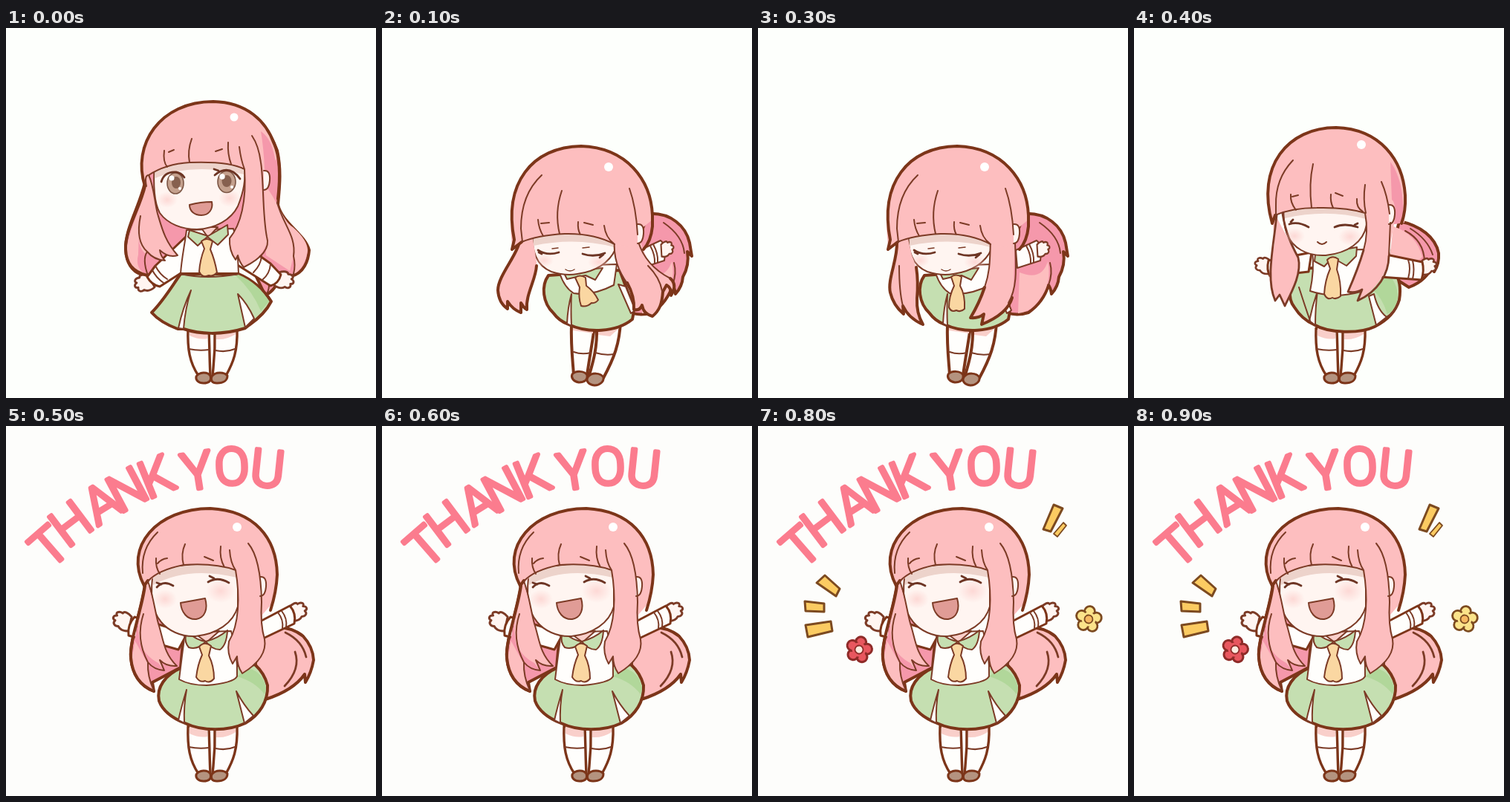
An HTML page for the animation above (1000 ms loop, 498 by 498 pixels).

```html
<!DOCTYPE html>
<html lang="en">
<head>
<meta charset="utf-8">
<title>Thank you</title>
<style>
html, body { margin: 0; width: 100%; height: 100%; overflow: hidden; background: #fdfffc; }
body { animation: paper 1s step-end infinite; }
svg { display: block; width: 100vw; height: 100vh; }
path, ellipse, circle { stroke-linecap: round; stroke-linejoin: round; }

/* line weights */
.o { stroke: #7c3519; stroke-width: 4; }
.i { stroke: #7c3b26; stroke-width: 2; }
.n { fill: none; }

/* fills */
.h { fill: #fdbebf; }
.d { fill: #f598ab; }
.s { fill: #fff5f1; }
.w { fill: #fffefc; }
.g { fill: #c5dfb1; }
.k { fill: #b1d79a; }
.t { fill: #fad7a2; }
.e { fill: #b4937f; }
.m { fill: #e09c96; }
.u { fill: #edd3cb; }
.p { fill: #f9cfca; }
.b { fill: url(#blush); }
.lash { fill: none; stroke: #6d3524; stroke-width: 2.8; }

.words text {
  font: 300 69px Roboto, Arial, sans-serif;
  text-anchor: middle;
  fill: #fb7c8e; stroke: #fb7c8e; stroke-width: 5.4; stroke-linejoin: round;
}

.pose, .words, .extras { visibility: hidden; animation: 1s step-end infinite; }
.stand { animation-name: stand; }
.bow { animation-name: bow; }
.swing { animation-name: swing; }
.hang { animation-name: hang; }
.rise { animation-name: rise; }
.cheer, .words { animation-name: cheer; }
.extras { animation-name: extras; }
@keyframes paper { 0% { background: #fdfffc } 50%, 100% { background: #fdfdfb } }
@keyframes stand { 0% { visibility: visible } 10%, 100% { visibility: hidden } }
@keyframes bow { 0% { visibility: hidden } 10% { visibility: visible } 40%, 100% { visibility: hidden } }
@keyframes swing { 0% { visibility: hidden } 10% { visibility: visible } 20%, 100% { visibility: hidden } }
@keyframes hang { 0% { visibility: hidden } 20% { visibility: visible } 40%, 100% { visibility: hidden } }
@keyframes rise { 0% { visibility: hidden } 40% { visibility: visible } 50%, 100% { visibility: hidden } }
@keyframes cheer { 0% { visibility: hidden } 50%, 100% { visibility: visible } }
@keyframes extras { 0% { visibility: hidden } 70%, 100% { visibility: visible } }
</style>
</head>
<body>
<svg viewBox="0 0 498 498" preserveAspectRatio="none">
<defs>
  <radialGradient id="blush">
    <stop offset="0" stop-color="#fcc9c6" stop-opacity=".65"/>
    <stop offset="1" stop-color="#fcc9c6" stop-opacity="0"/>
  </radialGradient>
  <g id="legs">
    <path class="w o" style="stroke-width:3.4" d="M245,404C244,432 247,450 259,468H275C274,448 274,430 273,406Z"/>
    <path class="w o" style="stroke-width:3.4" d="M281,406C282,440 279,455 278,468H296C306,450 312,435 311,404Z"/>
    <path class="p" d="M247,404V414Q260,420 271,418V404ZM283,404V419Q297,420 309,412V404Z"/>
    <path class="n i" d="M246,432Q260,435 273,433M282,434Q296,437 308,432"/>
    <path class="e o" style="stroke-width:3" d="M256,469C260,463 271,462 275,468C277,475 273,478 266,478C259,478 255,474 256,469ZM277,469C282,462 294,463 298,468C298,474 293,478 284,478C277,478 275,474 277,469Z"/>
  </g>
  <!-- hand pointing left, wrist at the origin -->
  <path id="hand" class="s i" style="stroke-width:2.6" d="M0,-9C-5,-13 -10,-14 -11,-11C-16,-13 -20,-10 -17,-7C-22,-6 -22,-2 -18,-1C-21,3 -17,6 -13,5C-10,9 -4,9 0,8Z"/>
  <path id="ear" class="s i" d="M-1,-13Q8,-14 7,0Q6,13 -1,13"/>
  <g id="flower">
    <g>
      <circle cy="-10.5" r="7"/><circle cy="-10.5" r="7" transform="rotate(72)"/>
      <circle cy="-10.5" r="7" transform="rotate(144)"/><circle cy="-10.5" r="7" transform="rotate(216)"/>
      <circle cy="-10.5" r="7" transform="rotate(288)"/>
    </g>
    <circle r="9.5" stroke="none"/>
  </g>
</defs>

<!-- standing -->
<g class="pose stand">
  <path class="d o" d="M187,208C180,240 160,270 161,298C162,317 169,327 182,332L190,334L243,300H320L349,360C358,355 365,347 366,337L384,334C401,330 407,313 408,299C402,277 372,263 366,238C368,215 371,192 365,165C354,135 335,115 320,112L200,180Z"/>
  <path class="h" d="M347,210C365,230 371,258 386,268C400,280 406,291 406,299C404,315 396,328 387,331Q390,320 387,307L382,327L350,306Z"/>
  <path class="n i" d="M365,235C373,265 391,280 387,307Q390,320 387,331M346,326Q359,342 351,358"/>
  <use href="#legs"/>
  <use href="#hand" transform="translate(196 341) rotate(-28) scale(1.1)"/>
  <use href="#hand" transform="translate(364 338) scale(-1.1 1.1) rotate(-22)"/>
  <path class="w o" style="stroke-width:3" d="M243,280L201,320L190,335Q196,346 207,348L240,327L245,298ZM308,283L356,317L370,332Q367,344 356,347L310,318Z"/>
  <path class="n i" d="M201,320Q207,332 217,338M197,326Q202,336 212,343M344,307Q343,319 333,329M356,318Q355,331 345,339"/>
  <path class="w i" d="M243,272L306,270C312,290 312,310 313,331H235C236,312 240,295 243,272Z"/>
  <path class="g o" d="M235,331H313C330,338 347,352 357,368C350,382 340,391 327,400L322,404C290,414 260,412 239,405L231,405C215,399 204,392 196,383C212,367 223,348 235,331Z"/>
  <path class="k" d="M313,332C330,339 346,353 354,368L343,381Q332,354 309,333Z"/>
  <path class="w i" d="M249,353Q238,376 232,404L239,405Q241,378 249,353ZM312,358L322,403L334,391Q325,371 312,358Z"/>
  <path class="n i" d="M235,331Q270,339 313,331"/>
  <path class="p i" d="M262,268L272,282L285,268Z"/>
  <path class="g i" d="M247,272L245,281L258,293L271,281L285,292L299,278L298,265L272,280Z"/>
  <path class="t i" d="M263,287Q270,281 278,287L275,298Q281,312 284,329Q279,335 273,333Q264,337 260,328Q261,312 267,297Z"/>
  <path class="s i" d="M200,180C198,209 199,235 207,249C218,264 237,271 257,271C282,270 303,258 312,240C320,220 323,205 321,180Z"/>
  <path class="u" d="M201,191Q250,174 319,186L320,197Q250,181 201,202Z"/>
  <path class="h" d="M185,212C172,160 204,99 279,99C340,101 363,145 365,175L352,192L345,215C347,252 356,268 350,292C343,310 330,316 320,322Q314,315 312,306L309,312Q300,300 301,283C316,265 323,233 321,190Q300,179 247,181Q215,183 192,198C199,212 200,235 204,250C210,270 214,287 231,306Q219,310 207,299Q208,307 214,313Q199,312 190,301C185,310 187,322 191,333C166,327 160,309 163,292C169,265 180,245 188,215Z"/>
  <path class="d" d="M343,139C359,150 365,174 365,220L357,222Q359,198 348,190Q347,163 343,139ZM179,272Q177,296 188,304Q185,318 190,332Q173,325 178,305Z"/>
  <use href="#ear" transform="translate(348 205)"/>
  <path class="n o" d="M187,213C169,157 207,99 279,99C324,100 350,125 361,156C370,176 369,204 366,230M187,213C180,243 160,272 161,298C162,317 170,328 190,333"/>
  <path class="n i" d="M189,213Q186,198 192,198Q215,183 247,181Q300,179 321,190C324,233 316,265 301,283Q300,300 309,312L312,306Q314,315 320,322C344,310 356,297 351,281C345,250 347,205 343,181Q340,158 331,145M192,198C199,212 200,235 204,250C210,270 214,287 231,306Q219,310 207,299Q208,307 214,313Q199,312 190,301C184,310 187,322 191,333M181,253Q174,287 190,301M213,165Q211,180 217,187M250,149Q244,165 247,181M299,154Q298,170 303,183M314,160Q316,177 321,190M219,167L226,164M282,166L291,163"/>
  <circle fill="#fff" cx="307" cy="120" r="5.5"/>
  <ellipse class="b" cx="217" cy="231" rx="14" ry="11"/><ellipse class="b" cx="301" cy="229" rx="15" ry="12"/>
  <ellipse cx="228" cy="209" rx="11" ry="14" fill="#c4a08d" stroke="#7c5645" stroke-width="1.6"/>
  <ellipse cx="297" cy="207" rx="12" ry="14.500" fill="#c4a08d" stroke="#7c5645" stroke-width="1.6"/>
  <ellipse cx="229" cy="208" rx="6" ry="8" fill="#86604f"/><ellipse cx="297" cy="206" rx="6.500" ry="8" fill="#86604f"/>
  <g fill="#fff"><circle cx="223" cy="202" r="3.500"/><circle cx="291" cy="200" r="3.700"/><circle cx="234" cy="216" r="2"/><circle cx="304" cy="214" r="2"/></g>
  <path class="lash" d="M209,207Q213,193 229,194Q236,195 240,201M281,198Q294,187 306,194Q312,198 315,203M280,190L286,192"/>
  <path class="m i" d="M247,238Q262,234 277,234C279,244 273,252 263,252C253,252 247,246 247,238Z"/>
</g>

<!-- bowing -->
<g class="pose bow">
  <path class="d o" d="M358,250C389,248 409,267 414,289L417,307L411,301Q414,319 405,335Q404,348 395,358Q394,350 391,346C386,363 377,374 364,383Q348,388 335,383L340,300Z"/>
  <path class="h" d="M352,329Q382,341 390,314Q396,343 379,365Q368,382 350,384Z"/>
  <path class="n i" d="M379,262Q405,280 407,303M391,346Q397,330 393,316"/>
  <path class="w o" d="M255,398C254,430 257,450 258,467H276C279,445 283,425 286,402Z"/>
  <path class="w o" d="M289,402C290,430 284,450 279,467L298,471C312,445 320,425 321,394Z"/>
  <path class="p" d="M257,400V407L284,411V402ZM291,402V413L307,415L319,404V397Z"/>
  <path class="n i" d="M258,436Q269,440 281,437M287,437Q300,441 312,439"/>
  <path class="e o" style="stroke-width:3" d="M256,466C261,461 272,461 276,467C277,474 272,477 265,477C258,476 254,471 256,466ZM277,470C282,463 294,464 298,470C299,476 293,481 286,481C278,480 274,475 277,470Z"/>
  <path class="g o" d="M224,333C214,347 216,370 231,384Q238,394 251,399C277,411 315,410 337,392Q340,380 337,372L320,326Z"/>
  <path class="w i" d="M255,358Q250,376 249,398L255,401Q254,378 255,358ZM318,345L335,384L341,380L328,348Z"/>
  <path class="w i" d="M239,330Q246,350 258,357Q283,361 312,346L316,318L255,320Z"/>
  <path class="g i" d="M244,328L249,338L262,335L274,333L287,339L297,323Z"/>
  <path class="s i" d="M203,272C200,304 211,321 228,328Q247,334 263,331C287,328 306,316 314,298V270Z"/>
  <path class="u" d="M204,276H313V295Q260,281 204,293Z"/>
  <path class="w i" d="M347,299L375,286Q383,292 380,313L349,323Z"/>
  <path class="n i" d="M361,293Q368,306 367,317M365,291Q372,304 371,315"/>
  <use href="#hand" transform="translate(376 300) scale(-.8 .95) rotate(4)"/>
</g>
<g class="pose swing">
  <path class="t i" d="M260,336Q266,331 274,336L275,347Q285,354 291,366Q287,371 282,370Q276,376 268,374Q264,363 266,349Z"/>
  <path class="h" d="M185,288C181,307 156,334 156,356Q158,370 168,377L169,368Q175,378 187,383L186,370Q189,376 195,379C193,357 209,337 208,315L203,284Z"/>
  <path class="n o" d="M185,288C181,307 156,334 156,353Q157,370 169,378L169,368Q176,379 187,383L187,370Q190,376 195,379C193,359 207,339 208,320"/>
  <path class="h" d="M312,283C312,308 316,320 330,343Q338,366 339,380Q348,380 350,375Q351,384 363,388C374,380 377,370 378,359L382,348Q387,350 389,359Q396,347 388,337C362,326 350,306 345,270Z"/>
  <path class="n o" d="M330,343Q340,361 339,379Q347,381 350,373Q352,385 364,388C374,380 377,370 378,355L383,346Q390,350 389,360Q398,346 388,337"/>
  <path class="n i" d="M313,285C311,309 318,327 331,345M345,288Q355,320 388,337M358,320Q374,336 377,354"/>
</g>
<g class="pose hang">
  <path class="t i" d="M260,335Q266,330 274,335L272,347Q279,359 278,378Q273,383 267,380Q260,383 257,376Q257,361 264,347Z"/>
  <path class="h" d="M187,288C188,312 174,338 178,356Q182,373 196,385L195,374Q203,391 222,399Q213,384 215,365C214,343 215,323 207,306L202,284Z"/>
  <path class="n o" d="M187,288C188,312 174,338 178,356Q182,373 196,385L195,374Q203,391 222,399Q213,384 214,364Q216,341 213,322"/>
  <path class="h" d="M312,283C312,309 313,326 305,349Q298,370 286,390Q297,391 304,385L301,399C324,389 341,374 344,350L346,270Z"/>
  <path class="n o" d="M305,349Q298,370 286,390Q297,391 304,385L301,399C323,390 338,378 342,363"/>
  <path class="n i" d="M313,285C312,309 313,326 305,349M346,288C347,320 350,348 337,370M190,320Q190,355 195,374"/>
</g>
<g class="pose bow">
  <path class="h" d="M176,298C163,208 200,160 268,159C330,161 361,205 364,258L353,267Q345,271 344,296L313,291Q282,277 246,277Q209,280 188,289Z"/>
  <use href="#ear" transform="translate(345 277)"/>
  <path class="n o" d="M188,288L175,298L178,285C163,209 202,160 268,159C330,161 362,205 364,252V267Q362,287 352,298"/>
  <path class="n i" d="M188,288Q209,279 246,277Q285,276 313,291M215,198Q187,224 187,270L189,288M242,219Q232,248 239,277M333,216Q342,241 344,278M210,258Q211,270 217,280M264,261Q263,271 267,278M299,266Q301,282 312,290M214,263L225,262M272,262L284,265"/>
  <circle fill="#fff" cx="305" cy="187" r="6"/>
  <ellipse class="b" cx="218" cy="313" rx="13" ry="9"/><ellipse class="b" cx="292" cy="315" rx="15" ry="10"/>
  <path class="lash" d="M210,299Q222,307 238,302M270,304Q285,309 300,303M211,302L215,304M298,305L293,309"/>
  <path class="n i" style="stroke-width:1.5" d="M229,297L237,296M270,296L279,295M247,325Q253,329 259,325"/>
</g>

<!-- rising -->
<g class="pose rise">
  <path class="d o" d="M357,260C386,266 406,282 410,303Q411,318 404,328L402,319Q394,340 370,349L340,330Z"/>
  <path class="h" d="M349,267Q380,277 388,308L366,330L344,310Z"/>
  <path class="n i" d="M365,273Q390,286 391,314M372,270Q395,284 402,305"/>
  <use href="#legs"/>
  <path class="g o" d="M223,324C208,343 206,364 216,376Q226,392 242,399C262,411 303,412 324,402Q350,389 357,366Q361,342 350,326L300,320Z"/>
  <path class="k" d="M341,330Q358,347 354,368Q349,383 341,385Q334,362 319,350Z"/>
  <path class="w i" d="M247,354Q240,374 236,394L244,400Q244,376 247,354ZM316,361L326,400L340,389Q328,380 323,358Z"/>
  <path class="n i" d="M222,349Q230,374 237,394M340,389Q353,382 357,366"/>
  <use href="#hand" transform="translate(183 323) rotate(8)"/>
  <use href="#hand" transform="translate(387 324) scale(-1 1) rotate(8)"/>
  <path class="w o" style="stroke-width:3" d="M239,302L181,313Q178,325 183,334L235,328ZM325,302L388,315Q391,326 387,339L318,334Z"/>
  <path class="n i" d="M369,312Q373,323 369,337M375,313Q378,325 375,338"/>
  <path class="w i" d="M240,300L311,298Q302,329 305,355Q270,365 237,354Q243,326 240,300Z"/>
  <path class="g i" d="M244,305L243,314L256,321L267,309L286,320L299,307L300,295Z"/>
  <path class="t i" d="M260,312Q267,305 275,311L273,325Q279,342 278,361Q272,366 267,363Q260,367 256,358Q257,340 264,324Z"/>
  <path class="s i" d="M202,240C199,272 209,290 225,299Q239,307 258,306C288,303 309,288 313,265V236Z"/>
  <path class="u" d="M203,242H312V257Q260,243 203,256Z"/>
  <path class="h" d="M187,262C163,184 209,134 272,134C332,136 362,178 364,223V262L350,264L343,301C344,326 327,353 300,367L307,354Q299,357 288,355Q302,323 309,299Q315,274 311,249Q283,242 246,242Q211,243 191,252C203,278 213,290 221,309C226,329 214,352 203,374L196,360L190,367C179,348 182,320 189,291Z"/>
  <path class="d" d="M345,180C360,200 364,231 362,262L350,264Q354,237 347,231Z"/>
  <use href="#ear" transform="translate(344 251)"/>
  <path class="n o" d="M190,252L186,263C164,186 207,134 272,134C332,136 362,178 365,225Q366,247 360,263"/>
  <path class="n i" style="stroke-width:2.800" d="M192,252C188,294 177,337 190,367L196,359L203,374C214,352 226,329 221,309C212,292 204,276 200,250M309,299Q302,323 288,355Q299,357 307,352L301,367C328,355 343,331 343,307"/>
  <path class="n i" d="M190,252Q213,242 246,242Q286,241 311,249Q316,275 309,299M343,307L345,262M214,178Q190,203 191,239V252M241,183Q235,210 239,242M333,207Q341,225 344,250M211,224Q210,235 218,245M265,224Q264,234 268,242M300,230Q299,242 308,247M311,211Q308,231 312,249M213,227L221,225M271,222L281,226"/>
  <circle fill="#fff" cx="306" cy="157" r="6"/>
  <ellipse class="b" cx="216" cy="280" rx="14" ry="11"/><ellipse class="b" cx="291" cy="281" rx="16" ry="12"/>
  <path class="lash" d="M209,264Q221,260 235,268M270,268Q283,262 301,268M211,261L214,258M297,265L301,263"/>
  <path class="n i" d="M247,288Q253,294 259,288"/>
</g>

<!-- cheering -->
<g class="pose cheer">
  <path class="d o" d="M187,213C183,245 166,290 168,312C170,334 179,349 199,357L197,345L235,325L240,270Z"/>
  <path class="h o" d="M340,274Q379,265 400,283Q413,297 414,315Q411,332 403,345L402,334C391,350 371,361 349,368L335,330Z"/>
  <path class="n i" style="stroke-width:2.800" d="M389,304Q397,327 375,350M376,278Q399,289 404,311"/>
  <use href="#legs"/>
  <path class="g o" d="M237,325C214,335 202,352 206,370Q213,389 241,400C264,411 299,411 322,400C341,389 353,371 352,349Q348,333 335,321Z"/>
  <path class="k" d="M326,326Q346,331 350,353L348,361Q335,344 311,337Z"/>
  <path class="w i" d="M243,355Q236,378 232,396L240,400Q239,377 243,355ZM310,357L321,400L333,390Q320,376 310,357Z"/>
  <use href="#hand" transform="translate(167 267) rotate(12) scale(1.15)"/>
  <use href="#hand" transform="translate(383 254) scale(-1.1 1.1) rotate(12)"/>
  <path class="w o" style="stroke-width:3" d="M244,279L173,257Q163,268 165,282L232,301ZM325,272L382,242Q391,252 388,266L327,295Z"/>
  <path class="n i" d="M181,260Q174,271 177,285M366,251Q374,261 372,273M371,249Q379,259 377,271"/>
  <path class="w i" d="M241,278L303,276Q312,306 311,337Q306,346 270,349Q247,349 233,341Q237,308 241,278Z"/>
  <path class="p i" d="M255,280L270,291L287,276Z"/>
  <path class="g i" d="M242,282Q240,291 246,298Q258,302 269,290Q277,301 288,301Q297,295 298,275Q285,286 269,290Q256,288 248,280Z"/>
  <path class="t i" d="M260,297Q267,289 276,296L273,309Q280,323 280,340Q274,347 268,343Q261,346 256,338Q258,321 264,308Z"/>
  <path class="s i" d="M199,190C193,226 196,249 209,264C218,275 235,284 255,283C284,280 306,265 312,243V184Z"/>
  <path class="u" d="M199,198Q247,180 311,190V204Q245,188 198,214Z"/>
  <path class="h" d="M187,215C158,163 203,111 275,111C334,114 364,150 365,200L358,239L345,254C342,275 357,294 342,312Q331,324 318,333Q311,323 311,310L305,320Q297,306 300,290C314,267 315,228 309,194Q281,185 239,187Q204,194 191,212C198,230 201,254 206,269C212,289 213,307 230,323Q216,324 207,315L213,329Q199,328 191,318Q190,337 199,356C175,348 164,327 171,304Z"/>
  <path class="d" d="M183,238Q175,263 180,291Q186,309 205,319L212,328Q196,328 188,315L173,288Z"/>
  <use href="#ear" transform="translate(343 216)"/>
  <path class="n o" d="M191,208L186,215C158,163 203,111 275,111C334,114 364,150 365,200Q364,223 356,248M187,215C183,247 166,288 168,312C170,334 179,349 199,357"/>
  <path class="n i" d="M191,209Q204,194 239,187Q281,184 309,194C315,229 314,267 300,290Q297,306 305,320L311,310Q311,323 318,333C341,319 351,304 348,287Q342,267 344,237Q343,178 326,158M191,209C199,230 201,254 206,269C212,289 213,307 230,323Q216,324 207,315L213,329Q199,328 191,318Q190,337 199,356M185,253Q174,286 191,318M202,178Q201,190 207,199M241,159Q235,172 239,187M289,162Q287,178 294,190M301,167Q302,184 309,194M204,185Q209,179 217,178M267,176L279,181M204,143Q181,165 184,198"/>
  <circle fill="#fff" cx="311" cy="136" r="6"/>
  <ellipse class="b" cx="214" cy="233" rx="16" ry="13"/><ellipse class="b" cx="289" cy="222" rx="20" ry="16"/>
  <path class="lash" d="M203,217Q212,207 225,215M272,210Q285,202 300,211M203,211L209,213M274,202L280,205"/>
  <path class="m i" d="M235,238Q252,235 268,232C272,246 268,258 256,260C244,261 236,251 235,238Z"/>
</g>

<g class="words">
  <text transform="translate(58 162) rotate(-41)" y="24.500">T</text>
  <text transform="translate(87 131) rotate(-37)" y="24.500">H</text>
  <text transform="translate(128 103) rotate(-32)" y="24.500">A</text>
  <text transform="translate(163 85) rotate(-28)" y="24.500">N</text>
  <text transform="translate(202 68) rotate(-22)" y="24.500">K</text>
  <text transform="translate(257 60) rotate(-9)" y="24.500">Y</text>
  <text transform="translate(304 54) rotate(-2)" y="24.500">O</text>
  <text transform="translate(352 57) rotate(6)" y="24.500">U</text>
</g>

<g class="extras">
  <path fill="#fbcb62" stroke="#7c4a20" stroke-width="3" d="M79,211L90,201L110,219L105,229ZM63,236L89,239V250L64,249ZM64,268L98,263L100,276L67,284ZM398,106L410,111L394,142L384,139Z"/>
  <path fill="#fbcb62" stroke="#7c4a20" stroke-width="1.800" d="M411,130L415,134L403,149L398,145Z"/>
  <g transform="translate(136 301) rotate(14)">
    <use href="#flower" fill="#e8575f" stroke="#8e2b28" stroke-width="3"/>
    <circle r="5.500" fill="#fdebe0" stroke="#8e2b28" stroke-width="1.800"/>
  </g>
  <g transform="translate(445 260) rotate(8)">
    <use href="#flower" fill="#fbe38a" stroke="#7c4a20" stroke-width="2.800"/>
    <circle r="5.500" fill="#f6b962" stroke="#7c4a20" stroke-width="1.800"/>
  </g>
</g>
</svg>
</body>
</html>
```
